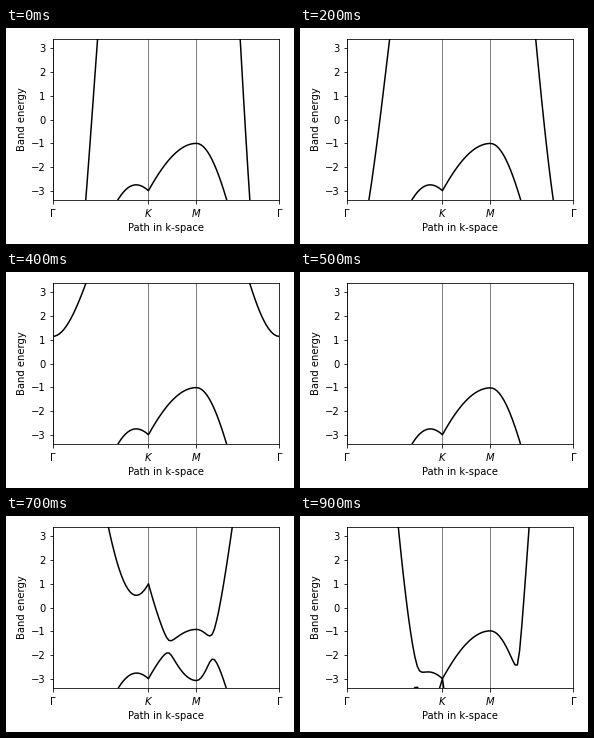
Animation, 288 px wide and 216 px high, one loop 1000 ms. Source, as a matplotlib script:

```python
import numpy as np
import matplotlib.pyplot as plt
from matplotlib.animation import FuncAnimation

plt.rcParams["font.family"] = "DejaVu Sans"

ONSITE = 5.0        # energies -ONSITE and +ONSITE on the two sites
COUPLING = 0.4      # nearest-neighbour hopping between the sites
HOPPINGS = np.arange(-5, 5)
N_POINTS = 101

# Reduced coordinates of Gamma, K, M, Gamma
NODES = np.array([[0, 0], [2 / 3, 1 / 3], [1 / 2, 1 / 2], [0, 0]])
LABELS = [r"$\Gamma$", r"$K$", r"$M$", r"$\Gamma$"]


def k_path(nodes, n_points):
    """Evenly spaced k-points along the path, with distances."""
    lattice = np.array([[1, 0], [0.5, np.sqrt(3) / 2]])
    reciprocal = np.linalg.inv(lattice).T
    steps = np.linalg.norm(np.diff(nodes, axis=0) @ reciprocal, axis=1)
    node_dist = np.concatenate([[0], np.cumsum(steps)])
    index = np.round(node_dist / node_dist[-1] * (n_points - 1)).astype(int)
    every = np.arange(n_points)
    points = np.column_stack([np.interp(every, index, c) for c in nodes.T])
    return points, np.interp(every, index, node_dist), node_dist


def bands(points, hopping):
    k1, k2 = 2 * np.pi * points.T
    same_site = 2 * (np.cos(k1) + np.cos(k2))
    first = -ONSITE - same_site
    second = ONSITE + hopping * same_site
    mix = COUPLING * np.abs(1 + np.exp(1j * k1) + np.exp(1j * k2))
    mean = (first + second) / 2
    split = np.hypot((first - second) / 2, mix)
    return mean - split, mean + split


points, dist, node_dist = k_path(NODES, N_POINTS)

fig, ax = plt.subplots(figsize=(4, 3), dpi=72)
ax.set_xlim(node_dist[0], node_dist[-1])
ax.set_ylim(-3.4, 3.4)
ax.set_xticks(node_dist, LABELS)
ax.set_yticks(range(-3, 4))
ax.set_xlabel("Path in k-space")
ax.set_ylabel("Band energy")
for x in node_dist:
    ax.axvline(x, color="k", linewidth=0.5)
lines = [ax.plot(dist, band, color="k", linewidth=1.5)[0]
         for band in bands(points, HOPPINGS[0])]
fig.tight_layout()


def update(i):
    for line, band in zip(lines, bands(points, HOPPINGS[i])):
        line.set_ydata(band)
    return lines


anim = FuncAnimation(fig, update, frames=len(HOPPINGS), interval=100,
                     repeat=True, repeat_delay=0)
plt.show()
```
